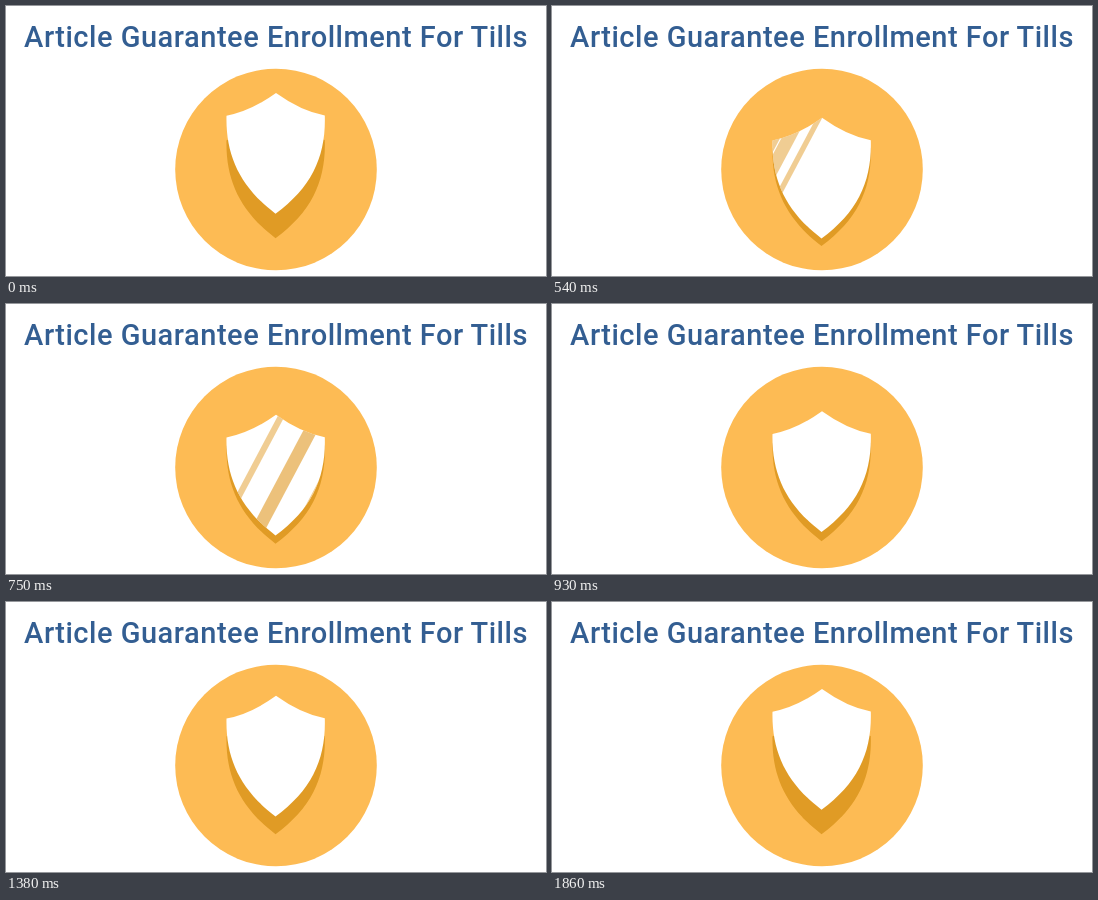
Recreate the animation shown at these times as an HTML page. Size 540x270 px, loop 1.92 s.

```html
<!DOCTYPE html>
<html lang="en">
<head>
<meta charset="utf-8">
<title>Shield</title>
<style>
  html, body { margin: 0; width: 100%; height: 100%; overflow: hidden; background: #fff; }
  svg { display: block; width: 540px; height: 270px; }
  text { font: 500 29px Roboto, Inter, sans-serif; letter-spacing: .5px; fill: #335e92; text-anchor: middle; }
</style>
</head>
<body>
<svg viewBox="0 0 540 270">
  <defs>
    <path id="shield" d="M270 87Q295 105 318.8 109.5C320 150 306 181 269.5 207.7C234.5 181 219.5 150 220.5 109.7Q245 105 270 87Z"/>
    <clipPath id="clip"><use id="mask" href="#shield"/></clipPath>
  </defs>
  <text x="270" y="41">Article Guarantee Enrollment For Tills</text>
  <circle cx="270" cy="163.5" r="100.8" fill="#fdbb54"/>
  <use id="shade" href="#shield" fill="#e09b25"/>
  <use id="face" href="#shield" fill="#fff"/>
  <g clip-path="url(#clip)">
    <!-- slanted so that x is measured at y = 124 -->
    <g id="shine" transform="matrix(1 0 -.53 1 65.72 0)" fill="#e8b25a"></g>
  </g>
</svg>
<script>
const LOOP = 1920, STEP = 30, TOP = 575;
const $ = id => document.getElementById(id);
const clamp = v => Math.min(1, Math.max(0, v));
const swing = p => (1 - Math.cos(Math.PI * clamp(p))) / 2;
const lower = (id, y) => $(id).setAttribute('transform', `translate(0 ${y})`);

// centre, width and speed of each band of the shine
const bands = [
  { x: 260.8, w: 6, speed: 83, alpha: g => clamp(.65 - .7 * Math.min(g, 0)) },
  { x: 241, w: 14.5, speed: 65, alpha: g => .65 + .15 * clamp(g) },
  { x: 229, w: 7, speed: 40, alpha: () => .65 }
];
for (const b of bands) {
  b.el = document.createElementNS('http://www.w3.org/2000/svg', 'rect');
  b.el.setAttribute('y', 60);
  b.el.setAttribute('width', b.w);
  b.el.setAttribute('height', 200);
  $('shine').append(b.el);
}

function draw(t) {
  const rise = swing((t / 590) ** .8);
  const faceY = 25 * (t < TOP ? rise : 1 - swing((t - TOP) / 1240));
  const shadeY = 24.5 + 8 * (t < TOP ? rise : 1 - swing((t - 640) / 690));
  lower('face', faceY);
  lower('mask', faceY);
  lower('shade', shadeY);

  const g = .714 * (Math.exp((t - 540) / 240) - 1);
  for (const b of bands) {
    b.el.setAttribute('x', b.x + b.speed * g - b.w / 2);
    b.el.setAttribute('fill-opacity', b.alpha(g));
  }
}

const start = performance.now();
function tick() {
  const t = (performance.now() - start) % LOOP;
  draw(Math.min(1860, Math.floor(t / STEP) * STEP));
  requestAnimationFrame(tick);
}
tick();
</script>
</body>
</html>
```
